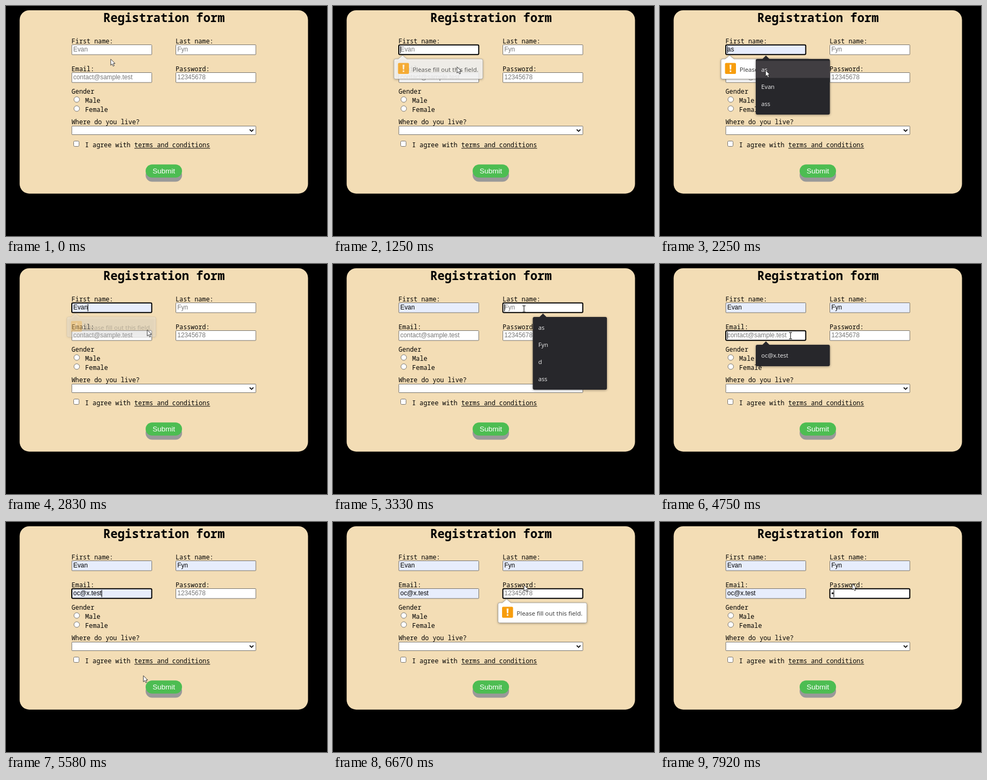
An HTML page with a canvas that plays this animation: 600 px wide and 430 px high, repeating every 8 s.

```html
<!DOCTYPE html>
<html lang="en">
<head>
<meta charset="utf-8">
<title>Registration form</title>
<style>
html, body { margin: 0; width: 100%; height: 100%; overflow: hidden; background: #000; }
canvas { display: block; width: 600px; height: 430px; }
</style>
</head>
<body>
<canvas id="stage"></canvas>
<script>
const canvas = document.getElementById('stage');
const ctx = canvas.getContext('2d');
const LOOP = 8000, STEP = 1000 / 12;
const MONO = '"Noto Sans Mono", "DejaVu Sans Mono", monospace';
const ARIAL = '"Liberation Sans", Arial, sans-serif';
const UI = '"Open Sans", "Noto Sans", sans-serif';
const FIRST = 'Evan', LAST = 'Fyn', EMAIL = 'oc@x.test';

const fields = {
  first: { x: 122.5, y: 72, label: 'First name:', hint: FIRST },
  last: { x: 317, y: 72, label: 'Last name:', hint: LAST },
  email: { x: 122.5, y: 124, label: 'Email:', hint: 'contact@sample.test' },
  password: { x: 317, y: 124, label: 'Password:', hint: '12345678' }
};

// Autofill popups: open from..to; the hovered row is previewed, then picked.
const menus = [
  { field: 'first', from: 1750, to: 2600, rows: ['as', FIRST, 'ass'], pick: FIRST },
  { field: 'last', from: 3200, to: 3960, rows: ['as', LAST, 'd', 'ass'], pick: LAST },
  { field: 'email', from: 4500, to: 5150, rows: [EMAIL], pick: EMAIL }
];
const focusAt = [[920, 'first'], [3150, 'last'], [4480, 'email'], [6080, 'password']];
const caretResets = [920, 1750, 2600, 3200, 3960, 4500, 5150, 6080, 7560];
const bubbles = [
  { field: 'first', from: 980, to: 2650 },
  { field: 'password', from: 6150, to: 7500 }
];
const presses = [[760, 920], [5980, 6080]];
const TYPED = 7560;

// Pointer hot spot: time, x, y
const path = [
  [0, 195.5, 99], [160, 200, 115], [620, 284, 304], [930, 287, 307],
  [1220, 231.5, 113.5], [1330, 231.5, 113.5], [1620, 198, 83], [1830, 197, 84],
  [2120, 197, 119], [2280, 197, 120], [2470, 198, 149], [2640, 199, 150],
  [3080, 357, 84], [3350, 357, 84], [3600, 386, 117], [3800, 391, 150],
  [4000, 390, 150], [4430, 244, 134], [4780, 244, 134], [5000, 215, 168],
  [5180, 214, 169], [5580, 256.5, 287], [5780, 286, 307], [6110, 288, 308],
  [6500, 350, 124], [6750, 359, 115], [8000, 359, 115]
];

const clamp = v => Math.max(0, Math.min(1, v));
const latest = (list, t) => list.filter(v => v <= t).pop();

function pointer(t) {
  const i = path.findIndex(p => p[0] > t);
  const a = path[i - 1], b = path[i];
  const k = (t - a[0]) / (b[0] - a[0]), e = k * k * (3 - 2 * k);
  return { x: a[1] + (b[1] - a[1]) * e, y: a[2] + (b[2] - a[2]) * e };
}

function inside(p, x, y, w, h) {
  return p.x >= x && p.x <= x + w && p.y >= y && p.y <= y + h;
}

function text(str, x, y, font, color = '#000', align = 'left') {
  ctx.font = font;
  ctx.fillStyle = color;
  ctx.textAlign = align;
  ctx.fillText(str, x, y);
}

function box(x, y, w, h, r, fill, stroke, line = 1) {
  ctx.beginPath();
  ctx.roundRect(x, y, w, h, r);
  if (fill) { ctx.fillStyle = fill; ctx.fill(); }
  if (stroke) { ctx.strokeStyle = stroke; ctx.lineWidth = line; ctx.stroke(); }
}

function poly(pts, fill, stroke, line = 1, close = true) {
  ctx.beginPath();
  pts.forEach(([x, y]) => ctx.lineTo(x, y));
  if (close) ctx.closePath();
  if (fill) { ctx.fillStyle = fill; ctx.fill(); }
  if (stroke) { ctx.strokeStyle = stroke; ctx.lineWidth = line; ctx.stroke(); }
}

function shadow(on) {
  ctx.shadowColor = on ? 'rgba(0,0,0,.4)' : 'transparent';
  ctx.shadowBlur = on ? 4 : 0;
  ctx.shadowOffsetY = on ? 1 : 0;
}

function menuBox(m) {
  const f = fields[m.field];
  return { x: f.x + 56.5, y: f.y + 27, w: 138.5, h: m.rows.length * 32 + 8 };
}

function hoverRow(m, p) {
  const b = menuBox(m);
  if (!inside(p, b.x, b.y + 4, b.w, b.h - 8)) return -1;
  return Math.min(m.rows.length - 1, Math.floor((p.y - b.y - 4) / 32));
}

function drawField(name, t, p, focus) {
  const f = fields[name];
  const menu = menus.find(m => m.field === name);
  let value = '', caretAtEnd = false;
  if (menu && t >= menu.to) {
    value = menu.pick;
    caretAtEnd = true;
  } else if (menu && t >= menu.from) {
    value = menu.rows[hoverRow(menu, p)] || '';
  }
  const typed = name === 'password' && t >= TYPED;
  const fill = value ? '#e7edfc' : '#fff';

  text(f.label, f.x, f.y - 2.2, '11.8px ' + MONO);
  if (focus) box(f.x + .5, f.y + .8, 149.4, 18, 2, fill, '#000', 2);
  else box(f.x + .5, f.y + .5, 149.5, 18.5, 1, fill, '#77736d');

  const tx = f.x + 3.3, ty = f.y + 13.4;
  ctx.font = '11.85px ' + ARIAL;
  let caret = tx + .3;
  if (typed) {
    ctx.beginPath();
    ctx.arc(tx + 2.2, f.y + 9.2, 1.8, 0, 7);
    ctx.fillStyle = '#000';
    ctx.fill();
    caret = tx + 4.6;
  } else {
    text(value || f.hint, tx, ty, '11.85px ' + ARIAL, value ? '#000' : '#777');
    if (caretAtEnd) caret += ctx.measureText(value).width;
  }
  const age = t - latest(caretResets, t);
  if (focus && age % 1060 < 530) {
    ctx.fillStyle = '#000';
    ctx.fillRect(caret - .5, f.y + 3, 1.1, 13.5);
  }
}

function drawButton(t, p) {
  const pressed = presses.some(([a, b]) => t >= a && t < b);
  const over = inside(p, 261, 296, 68, 25);
  const dy = pressed ? 4 : 0;
  box(261, pressed ? 304.5 : 304, 68, 24.5, 12.2, pressed ? '#666' : '#999');
  box(261, 296.3 + dy, 68, 24.5, 12.2, over ? '#3e8e41' : '#4dbd52');
  text('Submit', 295, 313.2 + dy, '13.5px ' + ARIAL, '#fff', 'center');
}

function drawForm(t, p) {
  const mono = '11.8px ' + MONO;
  ctx.fillStyle = '#000';
  ctx.fillRect(0, 0, 600, 430);
  box(25.5, 8, 539, 342.7, 18, '#f3ddb5');
  text('Registration form', 295.3, 30.4, 'bold 22.25px ' + MONO, '#000', 'center');

  const active = focusAt.filter(f => f[0] <= t).pop();
  for (const name in fields) drawField(name, t, p, active && active[1] === name);

  text('Gender', 122.5, 164, mono);
  ['Male', 'Female'].forEach((label, i) => {
    ctx.beginPath();
    ctx.arc(132.2, 174.8 + i * 17, 5.2, 0, 7);
    ctx.fillStyle = '#fff';
    ctx.fill();
    ctx.strokeStyle = '#77736d';
    ctx.lineWidth = 1;
    ctx.stroke();
    text(label, 148, 181 + i * 17, mono);
  });

  text('Where do you live?', 122.5, 221, mono);
  box(123, 224.5, 344, 16, 1, '#fff', '#77736d');
  if (!(t >= menus[1].from && t < menus[1].to)) {
    poly([[455.5, 230.8], [459, 234.3], [462.5, 230.8]], null, '#000', 1.8, false);
  }
  box(126.5, 252.5, 10, 10, 2, '#fff', '#77736d');
  text('I agree with ', 147.7, 264, mono);
  text('terms and conditions', 239.8, 264, mono);
  ctx.fillStyle = '#000';
  ctx.fillRect(240, 265.5, 141.5, 1);
  drawButton(t, p);
}

function drawBubble(b, t) {
  const alpha = clamp((t - b.from) / 330) * clamp((b.to + 250 - t) / 250);
  if (!alpha) return;
  const f = fields[b.field];
  const x = f.x - 8.5, y = f.y + 27, r = x + 166, bottom = y + 37.5;
  ctx.globalAlpha = alpha;
  shadow(true);
  ctx.beginPath();
  ctx.moveTo(x + 8, y);
  ctx.lineTo(x + 16, y - 6.8);
  ctx.lineTo(x + 24, y);
  ctx.arcTo(r, y, r, bottom, 3);
  ctx.arcTo(r, bottom, x, bottom, 3);
  ctx.arcTo(x, bottom, x, y, 3);
  ctx.arcTo(x, y, r, y, 3);
  ctx.closePath();
  ctx.fillStyle = '#fff';
  ctx.fill();
  shadow(false);
  ctx.strokeStyle = '#aaa6a0';
  ctx.lineWidth = 1;
  ctx.stroke();
  box(x + 7.5, y + 7.5, 20.5, 20.5, 2, '#f79d0d');
  poly([[x + 16.1, y + 10.8], [x + 19.5, y + 10.8], [x + 19, y + 19.8], [x + 16.6, y + 19.8]], '#fff');
  ctx.fillRect(x + 16.4, y + 21.5, 2.8, 2.8);
  text('Please fill out this field.', x + 34.8, y + 23.6, '11.5px ' + UI, '#333');
  ctx.globalAlpha = 1;
}

function drawMenu(m, t, p) {
  if (t < m.from || t >= m.to) return;
  const { x, y, w, h } = menuBox(m);
  shadow(true);
  box(x, y, w, h, 3, '#27272b');
  shadow(false);
  poly([[x + 12, y + .5], [x + 19, y - 6.5], [x + 26, y + .5]], '#27272b');
  const hover = hoverRow(m, p);
  m.rows.forEach((label, i) => {
    if (i === hover) {
      ctx.fillStyle = '#413e42';
      ctx.fillRect(x, y + 3.5 + i * 32, w, 32);
    }
    text(label, x + 10.3, y + 24 + i * 32, '11.2px ' + UI, '#f1f1f1');
  });
}

function drawPointer(t, p) {
  const onMenu = menus.some(m => {
    const b = menuBox(m);
    return t >= m.from && t < m.to && inside(p, b.x, b.y, b.w, b.h);
  });
  const onField = Object.values(fields).some(f => inside(p, f.x, f.y, 150, 19));
  ctx.save();
  ctx.translate(p.x, p.y);
  ctx.lineJoin = 'round';
  if (inside(p, 261, 296, 68, 25)) {
    ctx.beginPath();
    ctx.moveTo(-1.5, 8);
    ctx.lineTo(-1.5, 1);
    ctx.quadraticCurveTo(0, -1, 1.5, 1);
    ctx.lineTo(1.5, 5);
    ctx.lineTo(8, 6.5);
    ctx.quadraticCurveTo(9, 12, 6.5, 15.5);
    ctx.lineTo(-.5, 15.5);
    ctx.lineTo(-5, 9.5);
    ctx.quadraticCurveTo(-4.5, 7, -1.5, 10);
    ctx.closePath();
    ctx.fillStyle = '#fff';
    ctx.fill();
    ctx.strokeStyle = '#111';
    ctx.lineWidth = 1;
    ctx.stroke();
  } else if (onField && !onMenu) {
    ctx.fillStyle = '#222';
    ctx.fillRect(-.6, -6, 1.2, 12);
    ctx.fillRect(-3, -6.5, 6, 1.1);
    ctx.fillRect(-3, 5.4, 6, 1.1);
  } else {
    poly([[.3, .3], [.3, 11.8], [2.9, 9.3], [4.8, 13.5], [6.8, 12.6], [5, 8.6], [8.3, 8.4]],
      '#fff', '#222', .9);
  }
  ctx.restore();
}

function draw(t) {
  const p = pointer(t);
  drawForm(t, p);
  bubbles.forEach(b => drawBubble(b, t));
  menus.forEach(m => drawMenu(m, t, p));
  drawPointer(t, p);
}

const ratio = window.devicePixelRatio || 1;
canvas.width = 600 * ratio;
canvas.height = 430 * ratio;
ctx.scale(ratio, ratio);

const start = performance.now();
function tick() {
  const t = (performance.now() - start) % LOOP;
  draw(Math.floor((t + 7) / STEP) * STEP % LOOP);
  requestAnimationFrame(tick);
}
tick();
</script>
</body>
</html>
```
